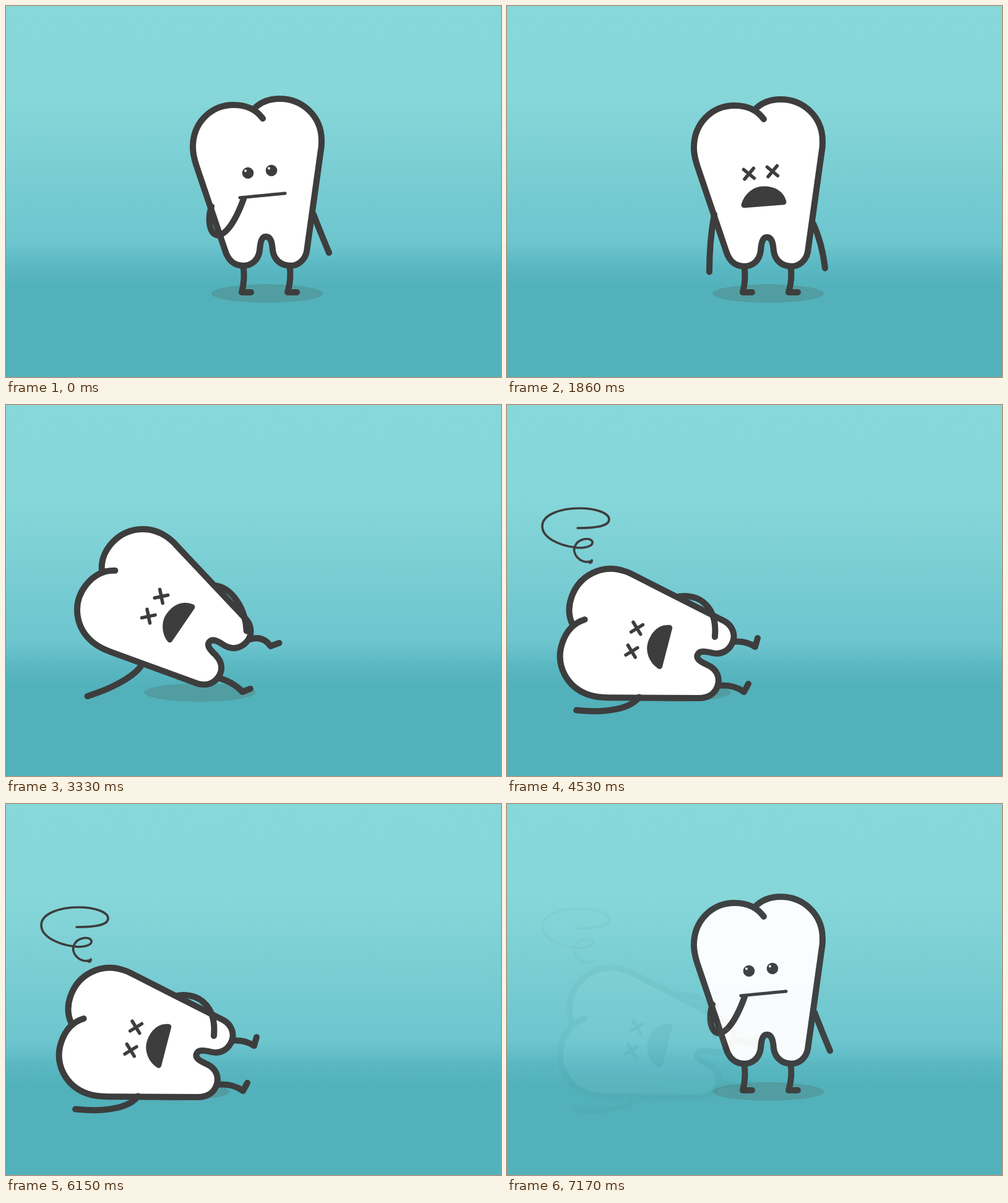
These frames come from a looping animation (800x600 px, 7.2 s). An HTML page:

```html
<!DOCTYPE html>
<html lang="en">
<head>
<meta charset="utf-8">
<title>Fainting tooth</title>
<style>
html, body { margin: 0; width: 100%; height: 100%; overflow: hidden; background: #52b1bb; }
svg { display: block; width: 100%; height: 100%; }
.line { fill: none; stroke: #3d3d3d; stroke-width: 10; stroke-linecap: round; stroke-linejoin: round; }
.ink { fill: #3d3d3d; }
</style>
</head>
<body>
<svg viewBox="0 0 800 600">
  <defs>
    <linearGradient id="wall" x1="0" y1="0" x2="0" y2="1">
      <stop offset="0" stop-color="#88d8da"/>
      <stop offset=".24" stop-color="#87d7d9"/>
      <stop offset=".64" stop-color="#6dc5ce"/>
      <stop offset=".7" stop-color="#5bb8c3"/>
      <stop offset=".76" stop-color="#52b1bb"/>
    </linearGradient>
  </defs>
  <g id="main"></g>
  <g id="next"></g>
</svg>
<script>
const LOOP = 7200;
const FALL = 2850, FALL_TIME = 548, FALL_ANGLE = 71, MID_ANGLE = 51;
const FADE = 6480;

// Cubic arms in body space: shoulder, two controls, hand.
const armsThink = [332, 324, 318, 370, 350, 405, 384, 312, 497, 337, 505, 358, 514, 380, 522, 399];
const armsSad = [335, 336, 329, 369, 327, 404, 327, 429, 495, 351, 504, 371, 511, 397, 514, 423];
const armsMid = [325, 311, 299, 315, 257, 294, 228, 275, 499, 326, 510, 348, 500, 384, 472, 409];
const armsDown = [325, 306, 304, 299, 284, 269, 272, 217, 500, 314, 514, 343, 506, 378, 457, 390];

// Legs in stage space: knee control, ankle, toe.
const legsUp = [387, 441, 381, 463, 396, 463, 462, 441, 455, 463, 470, 463];
const legsMid = [368, 448, 382, 464, 395, 459, 413, 369, 428, 390, 442, 385];
const legsDown = [366, 451, 383, 464, 390, 451, 384, 380, 401, 391, 405, 377];

const mouthFlat = [378, 310, 451, 303, 440, 304, 427, 305, 415, 306.5, 402, 307.5, 390, 309, 378, 310];
const mouthSad = [383, 321, 447, 316, 443, 301, 430, 295, 415, 295, 400, 295, 387, 306, 383, 321];

const clamp = v => Math.max(0, Math.min(1, v));
const span = (t, from, to) => clamp((t - from) / (to - from));
const ease = v => v * v * (3 - 2 * v);
const lerp = (a, b, v) => a + (b - a) * v;
const mix = (a, b, v) => a.map((n, i) => lerp(n, b[i], v));
const bump = (t, from, length) => Math.sin(Math.PI * span(t, from, from + length)) ** 2;
const cubic = p => `M${p[0]},${p[1]}C${p.slice(2)}`;

function makeScene(root) {
  root.innerHTML = `
    <rect width="800" height="600" fill="url(#wall)"/>
    <ellipse data-n="shadow" cy="465" rx="90" ry="15" fill="#519da1"/>
    <path data-n="legs" class="line"/>
    <g data-n="body">
      <path class="line" style="fill:#fff" d="M415,182C404,167 388,160 368,160
        C330,160 302,190 302,228C302,240 305,250 308,259L354,395
        C359,412 370,420 383,420C398,420 408,410 410,395
        C411,382 413,373 420,373C428,373 430,382 431,395
        C433,410 444,420 460,420C472,420 483,411 486,397L509,232
        C510,227 510,222 510,218C510,178 479,150 442,150C425,150 411,156 401,166"/>
      ${[[391, 270], [429, 266]].map(([x, y]) => `<g transform="translate(${x} ${y})">
        <g data-n="round"><circle class="ink" r="9.3"/><circle cx="-4" cy="-3.5" r="2" fill="#fff"/></g>
        <path data-n="cross" class="line" style="stroke-width:5.5" d="M-8.5-6.5L8.5,7.5M7.5-8.5L-7,9"/>
      </g>`).join('')}
      <path data-n="mouth" class="line" style="fill:#3d3d3d"/>
      <path data-n="arms" class="line"/>
    </g>
    <path data-n="swirl" class="line" style="stroke-width:3.6" pathLength="1"
      d="M137,251C138,256 131,256 134,253C118,257 104,240 110,228C115,216 134,213 138,221
      C140,231 118,232 108,230C85,227 57,215 57,196C57,176 90,167 116,167
      C145,167 165,175 165,185C165,197 140,199 114,199"/>`;
  const all = n => root.querySelectorAll(`[data-n=${n}]`);
  const one = n => all(n)[0];
  return {
    shadow: one('shadow'), legs: one('legs'), body: one('body'), mouth: one('mouth'),
    arms: one('arms'), swirl: one('swirl'), round: all('round'), cross: all('cross')
  };
}

function fallAngle(t) {
  const u = (t - FALL) / FALL_TIME;
  if (u <= 0) return 0;
  if (u < 1) return FALL_ANGLE * u ** 2.5;
  const late = t - FALL - FALL_TIME;
  return FALL_ANGLE + 2.5 * Math.sin(late / 57) * Math.exp(-late / 150);
}

function draw(s, t) {
  const angle = fallAngle(t);
  const early = clamp(angle / MID_ANGLE);
  const late = Math.max(0, (angle - MID_ANGLE) / (FALL_ANGLE - MID_ANGLE));
  const pose = (a, b, c) => late > 0 ? mix(b, c, late) : mix(a, b, early);
  const shock = 1 - (1 - span(t, 1110, 1560)) ** 3;
  const twitch = t > 4860 ? bump((t - 4860) % 1620, 0, 780) : 0;

  const bob = (ease(span(t, 0, 630)) + bump(t, 1110, 500) + bump(t, 1860, 990)) * (1 - early);
  const [dx, dy] = pose([0, 0], [-6.5, 6], [-0.5, 6]);
  const x = dx, y = dy + bob;
  s.body.setAttribute('transform', `translate(${x} ${y}) rotate(${-angle} 382 464)`);
  s.shadow.setAttribute('cx', 422 - 2.12 * angle);

  const arms = pose(mix(armsThink, armsSad, shock), armsMid, armsDown);
  for (const i of [4, 6]) {
    arms[i] -= 4 * twitch;
    arms[i + 1] += 1.4 * twitch;
  }
  arms[14] += 3 * ease(span(t, 0, 630)) * (1 - shock);
  s.arms.setAttribute('d', cubic(arms.slice(0, 8)) + cubic(arms.slice(8)));

  const rad = -angle * Math.PI / 180, cos = Math.cos(rad), sin = Math.sin(rad);
  const hip = (px, py) => [
    382 + x + (px - 382) * cos - (py - 464) * sin,
    464 + y + (px - 382) * sin + (py - 464) * cos
  ];
  const legs = pose(legsUp, legsMid, legsDown);
  legs[4] += 5 * twitch;
  legs[10] += 6 * twitch;
  const leg = (h, p) => `M${h}Q${p.slice(0, 4)}L${p.slice(4)}`;
  s.legs.setAttribute('d', leg(hip(383, 418), legs.slice(0, 6)) + leg(hip(458, 418), legs.slice(6)));

  const m = mix(mouthFlat, mouthSad, shock);
  s.mouth.setAttribute('d', `M${m.slice(0, 2)}L${m.slice(2, 4)}C${m.slice(4)}Z`);
  s.mouth.style.strokeWidth = lerp(5, 9, shock);
  const shut = ease(span(t, 1110, 1230)), open = ease(span(t, 1200, 1350));
  const size = (el, v) => {
    el.setAttribute('transform', `scale(${v})`);
    el.style.display = v > 0 ? '' : 'none';
  };
  s.round.forEach(el => size(el, 1 - shut));
  s.cross.forEach(el => size(el, open));

  const drawn = ease(span(t, 3450, 4050));
  s.swirl.style.display = drawn > 0 ? '' : 'none';
  s.swirl.style.strokeDasharray = `${drawn} 2`;
  s.swirl.setAttribute('transform', `translate(0 ${2 * Math.sin((t - 4530) / 810 * 2 * Math.PI)})`);
}

const next = document.getElementById('next');
const main = makeScene(document.getElementById('main'));
draw(makeScene(next), 0);

function frame(now) {
  const t = now % LOOP;
  draw(main, t);
  const fade = span(t, FADE, LOOP);
  next.style.opacity = fade;
  next.style.display = fade > 0 ? '' : 'none';
  requestAnimationFrame(frame);
}
frame(0);
</script>
</body>
</html>
```
